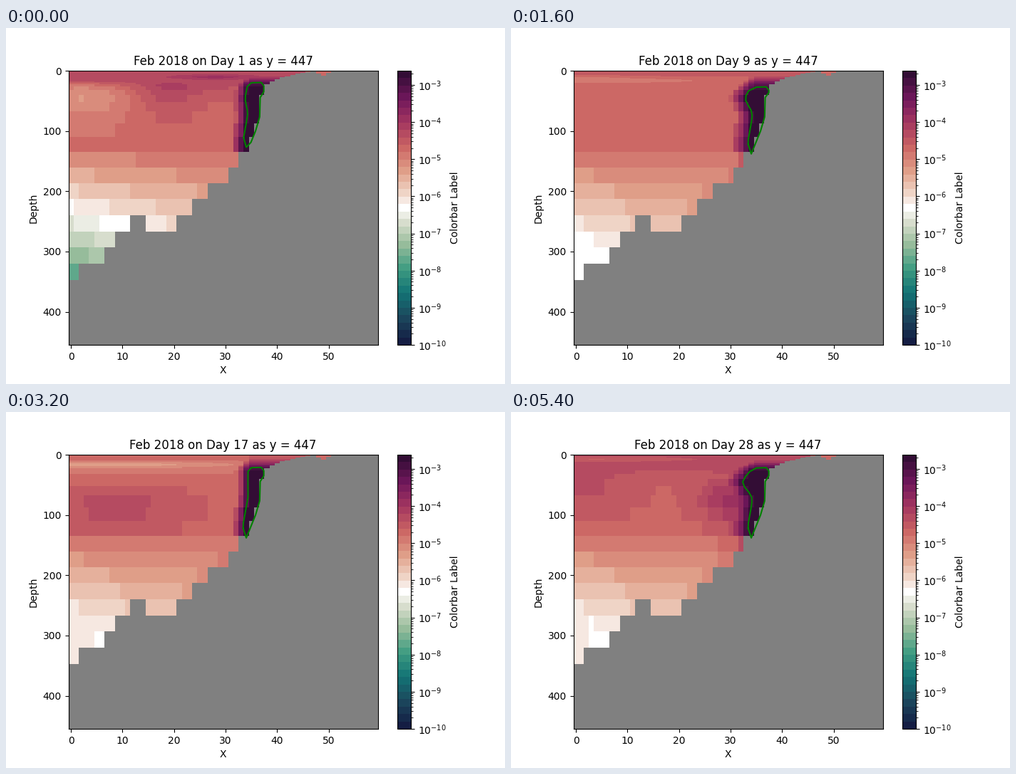
A matplotlib script that plays this animation: 700 px wide and 500 px high, repeating every 5600 ms.

```python
import numpy as np
import matplotlib.pyplot as plt
from matplotlib.animation import FuncAnimation
from matplotlib.colors import LinearSegmentedColormap, LogNorm

DAYS = 28
NX, NZ, BANDS = 60, 40, 37
LOG_MIN, LOG_MAX = -10, -2.616

# Stretched vertical grid: 1 m cells at the surface, about 27 m at the bottom
steps = 13.966 + 12.966 * np.tanh((np.arange(NZ - 1) - 23) / 3.03)
depth = 0.5 + np.concatenate([[0], np.cumsum(steps)])
mids = (depth[1:] + depth[:-1]) / 2
z_edges = np.concatenate([[0], mids, [2 * depth[-1] - mids[-1]]])
x_edges = np.arange(NX + 1) - 0.5
cols, rows = np.arange(NX)[None, :], np.arange(NZ)[:, None]

# Sea floor: (column, number of wet cells)
FLOOR = [(0, 36), (2, 35), (6, 35), (7, 34.4), (11, 32.55), (12, 32), (14, 32),
         (15, 33), (20, 33), (21, 32.3), (32, 29), (33, 28), (34, 28),
         (36, 26), (37, 23), (41, 11), (44, 5), (47, 1), (48, 5), (49, 8),
         (50, 4), (51, 0)]
land = rows >= np.round(np.interp(cols, *zip(*FLOOR)))


def bell(v, centre, width):
    return np.exp(-((v - centre) / width) ** 2)


def patch(day, amp, when, x, row):
    """A soft spot in time and space; each pair is (centre, width)."""
    return amp * bell(day, *when) * bell(cols, *x) * bell(rows, *row)


def spread(day):
    """How far the plume reaches off the bank, with two pulses in the month."""
    return bell(day, 6, 4) + bell(day, 26, 4)


def plume_top(day):
    return np.interp(day, [1, 6, 12, 17, 20, 24, 28],
                     [20, 26, 28.5, 21.5, 31, 25, 22])


def plume_left(day, z):
    taper = 0.95 * np.clip((z - 70) / 45, 0, 1)
    return 34.35 - taper - 2.6 * spread(day) * bell(z, 46, 17)


def outline(day):
    top = plume_top(day)
    foot = 138 - 11 * bell(day, 1, 3)
    z = np.linspace(foot - 16, top + 6, 12)
    left = np.column_stack([plume_left(day, z), z])
    right = [(35, top), (36.9, top - 0.5), (37.4, top + 5),
             (37.4, max(35, top + 9)), (36.7, 44.5), (36.6, 76.6),
             (35.8, 100), (34.9, 119), (34, foot)]
    return np.vstack([left, right, left[:1]])


def plume(day):
    sink = (plume_top(day) - 21) / 4 * (rows < 22)
    peak = 26.5 + 9.5 * np.clip((rows - sink) / 21, 0, 1) ** 2
    peak = np.where(rows > 28, 0, peak - 4.5 * (rows == 28))
    gap = np.maximum(0, plume_left(day, depth)[:, None] + 0.2 - cols)
    return peak - (4.3 - 2.5 * spread(day)) * gap


def background(day):
    surface = 25.8 + 2.2 * np.cos(np.pi * (day - 1) / DAYS) ** 2
    band = 26 + (surface - 26) / (1 + np.exp(rows - 22.0))

    # Values fall off towards the deep left side, down to a floor
    start = bell(day, 1, 3)
    fall = (1.35 + 0.55 * start) * np.maximum(0, rows - 27)
    floor = 19 - 0.12 * cols - 8 * start
    floor = floor - 2.4 * (bell(day, 6, 3) + bell(day, 24, 2.5))
    band = np.maximum(band - fall * np.exp(-cols / 50), floor)

    band += patch(day, 2.1, when=(19, 7), x=(9, 16), row=(25.3, 2))
    band += patch(day, -3.2, when=(15, 7), x=(8, 28), row=(15.5, 5))
    band += patch(day, -3.3, when=(1, 3.5), x=(2, 10), row=(22, 3.5))
    band += patch(day, 1.6, when=(1, 3.5), x=(19, 6), row=(22, 3.5))
    band += patch(day, 2, when=(1, 3.5), x=(28, 8), row=(10, 4))
    band += patch(day, -2.4, when=(6, 3), x=(0, 9), row=(12, 4))
    band += patch(day, -2.3, when=(26, 3), x=(4, 18), row=(7, 4))
    band += patch(day, 1.6, when=(28, 3), x=(0, 8), row=(23.5, 2.5))
    band += patch(day, 4, when=(27, 3.5), x=(30, 6), row=(24.8, 2))
    return band


def concentration(day):
    band = np.maximum(background(day), plume(day))
    band = np.where(cols > 45, 26, band)
    band = np.clip(np.round(band), 0, BANDS - 1)
    value = 10 ** (LOG_MIN + (LOG_MAX - LOG_MIN) * (band + 0.5) / BANDS)
    return np.ma.array(value, mask=land)


LOW = ["#141d43", "#1c485d", "#127375", "#3f9c81", "#99bd9c", "#dfe1d3"]
HIGH = ["#f1dace", "#e0a089", "#cb6563", "#a43660", "#6f175b", "#330d35"]
ends = np.arange(12) / 11
cmap = LinearSegmentedColormap.from_list(
    "ramp", list(zip([*ends[:6], 0.5, *ends[6:]], LOW + ["white"] + HIGH)),
    N=BANDS)

fig, ax = plt.subplots(figsize=(7, 5), dpi=100)
ax.set_facecolor("gray")
mesh = ax.pcolormesh(x_edges, z_edges, concentration(1), cmap=cmap,
                     norm=LogNorm(10.0 ** LOG_MIN, 10.0 ** LOG_MAX))
fig.colorbar(mesh, ax=ax, label="Colorbar Label")
line, = ax.plot([], [], color="green", lw=1.5)
ax.set_xlim(x_edges[0], x_edges[-1])
ax.set_ylim(z_edges[-1], 0)
ax.set_xlabel("X")
ax.set_ylabel("Depth")
title = ax.set_title("")


def update(i):
    day = i + 1
    mesh.set_array(concentration(day))
    line.set_data(*outline(day).T)
    title.set_text(f"Feb 2018 on Day {day} as y = 447")
    return mesh, line, title


anim = FuncAnimation(fig, update, frames=DAYS, interval=200,
                     repeat=True, repeat_delay=0, blit=False)
plt.show()
```
